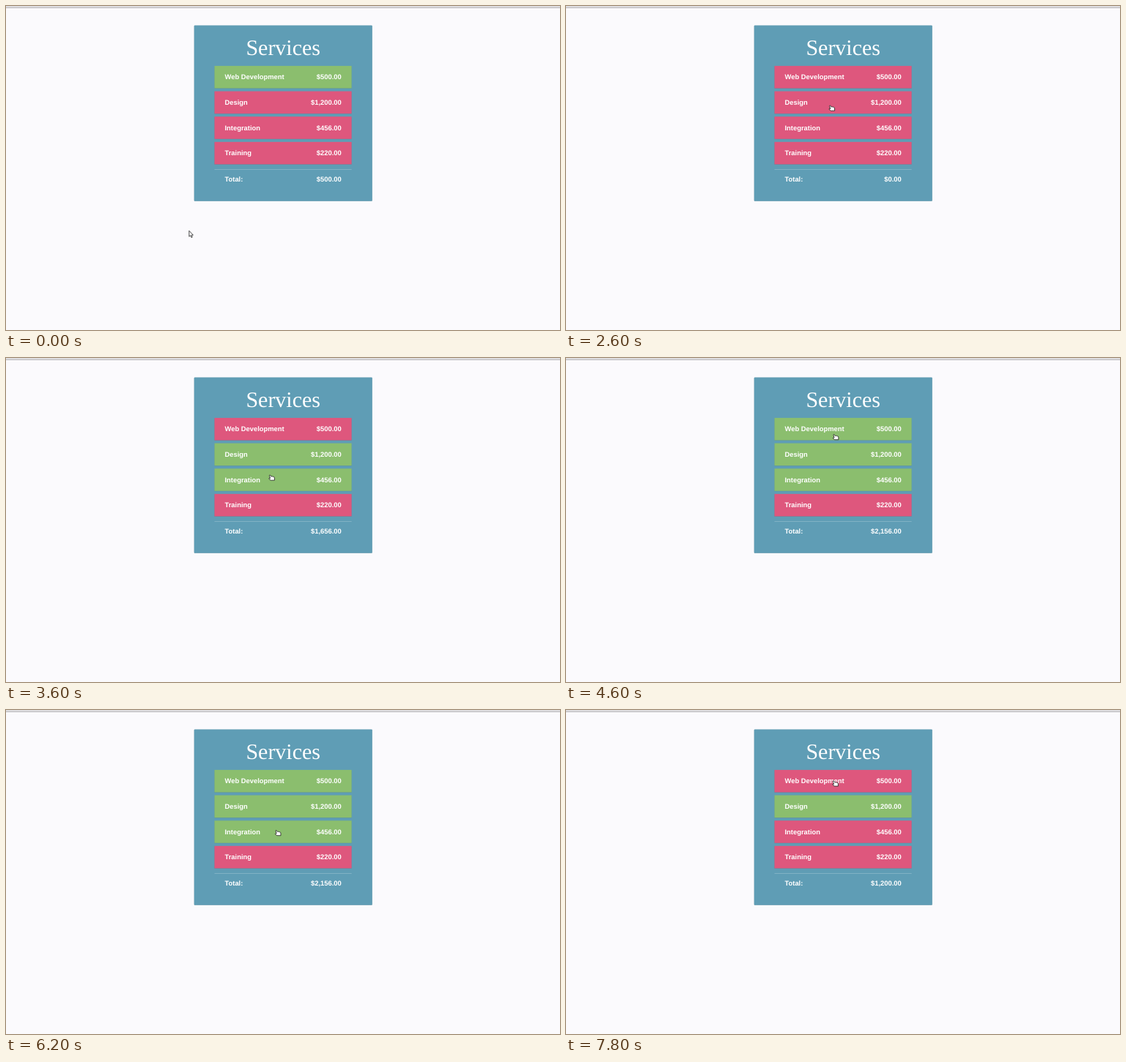
These frames come from a looping animation (756x443 px, 8 s). An HTML page:

```html
<!DOCTYPE html>
<html lang="en">
<head>
<meta charset="utf-8">
<title>Services order form</title>
<style>
  html, body { margin: 0; width: 100%; height: 100%; overflow: hidden; background: #fbfafd; }
  svg { display: block; width: 756px; height: 443px; }
  text { fill: #fff; text-rendering: geometricPrecision; }
  .title { font: 30px "Liberation Serif", "Times New Roman", serif; text-anchor: middle; }
  .label, .price { font: bold 9.4px "Liberation Sans", Arial, sans-serif; }
  .price { text-anchor: end; }
  .box { fill: #de577d; }
  .on .box { fill: #8bbe6e; }
  .shade { fill: #000; opacity: .1; }
  .cursor { fill: #fff; stroke: #1c1c1c; stroke-width: .8; stroke-linejoin: round; }
</style>
</head>
<body>
<svg viewBox="0 0 756 443">
  <rect width="756" height="2" fill="#dedde0"/>
  <rect y="2" width="756" height="1" fill="#bbbabd"/>

  <rect x="256.7" y="26.8" width="243.1" height="240.3" rx="1" fill="#ccc"/>
  <rect x="256.7" y="26.4" width="243.1" height="240.3" rx="1" fill="#5f9db5"/>
  <text class="title" x="378.2" y="67.3">Services</text>

  <g id="rows"></g>

  <rect x="284.5" y="223" width="187.1" height="1" fill="#80b1c4"/>
  <text class="label" x="298.5" y="240.3">Total:</text>
  <text class="price" id="total" x="457.7" y="240.3"></text>

  <g id="cursor" class="cursor">
    <path id="arrow" d="M.3 .3V8.3L2.1 6.7L3.4 9.6L4.7 9L3.5 6.2H5.8Z"/>
    <path id="hand" d="M-1.6 1Q-1.4 .2 -.6 .5L1 2.6Q2 2 2.8 2.6Q3.6 2.4 4.2 3Q5.2 3 5.3 4.2L5.4 7.7H.2L-2.3 5.6Q-2.3 4.8 -1.5 4.8L-.4 5Z"/>
  </g>
</svg>

<script>
  const LOOP = 8000, STEP = 200;
  const LEFT = 284.5, TOP = 81.9, WIDTH = 187.1, HEIGHT = 30.6, PITCH = 34.65;
  const services = [
    ["Web Development", 500],
    ["Design", 1200],
    ["Integration", 456],
    ["Training", 220]
  ];

  // The pointer glides between a few stops and clicks whatever row it is on.
  const home = { x: 249.6, y: 307 };
  const glides = [
    { from: 200, to: 1400, x: 356.8, y: 102.6 },
    { from: 2400, to: 2600, x: 361.2, y: 135.5 },
    { from: 3400, to: 3600, x: 361, y: 159.5 },
    { from: 4200, to: 4400, x: 366.5, y: 104 },
    { from: 4800, to: 5200, x: 375.7, y: 204 },
    { from: 5800, to: 6200, x: 369.6, y: 164 },
    { from: 6800, to: 7800, x: 366, y: 96.4 }
  ];
  const clicks = [1800, 3200, 3600, 4600, 5200, 5600, 6600, 7400];

  const byId = id => document.getElementById(id);
  const money = n => "$" + n.toLocaleString("en-US", { minimumFractionDigits: 2 });
  const show = (el, visible) => el.setAttribute("display", visible ? "inline" : "none");
  const clamp = v => Math.min(1, Math.max(0, v));
  const easeOut = p => 1 - (1 - p) ** 2;

  byId("rows").innerHTML = services.map(([name, price], i) => {
    const y = TOP + i * PITCH, base = y + 18.5;
    const rect = (cls, top) =>
      `<rect class="${cls}" x="${LEFT}" y="${top}" width="${WIDTH}" height="${HEIGHT}"/>`;
    return `<g>${rect("shade", y + .5)}${rect("box", y)}
      <text class="label" x="298.5" y="${base}">${name}</text>
      <text class="price" x="457.7" y="${base}">${money(price)}</text></g>`;
  }).join("");
  const rows = [...byId("rows").children];

  function pointerAt(t) {
    const now = Math.floor(t / STEP) * STEP + STEP;
    return glides.reduce((pos, { from, to, x, y }) => {
      const p = easeOut(clamp((now - from) / (to - from + STEP)));
      return { x: pos.x + (x - pos.x) * p, y: pos.y + (y - pos.y) * p };
    }, home);
  }

  // Index of the row under a point, or -1
  function rowAt({ x, y }) {
    const inside = x >= LEFT && x <= LEFT + WIDTH;
    return services.findIndex((_, i) => {
      const top = TOP + i * PITCH;
      return inside && y >= top && y <= top + HEIGHT;
    });
  }

  const clicked = clicks.map(at => ({ at, row: rowAt(pointerAt(at)) }));

  function draw(t) {
    const chosen = services.map((_, i) => i === 0);
    for (const { at, row } of clicked) if (t >= at) chosen[row] = !chosen[row];
    rows.forEach((row, i) => row.classList.toggle("on", chosen[i]));
    byId("total").textContent =
      money(services.reduce((sum, [, price], i) => sum + chosen[i] * price, 0));

    const pos = pointerAt(t), over = rowAt(pos) >= 0;
    byId("cursor").setAttribute("transform", `translate(${pos.x} ${pos.y})`);
    show(byId("hand"), over);
    show(byId("arrow"), !over);
  }

  const start = performance.now();
  function tick() {
    draw((performance.now() - start) % LOOP);
    requestAnimationFrame(tick);
  }
  tick();
</script>
</body>
</html>
```
